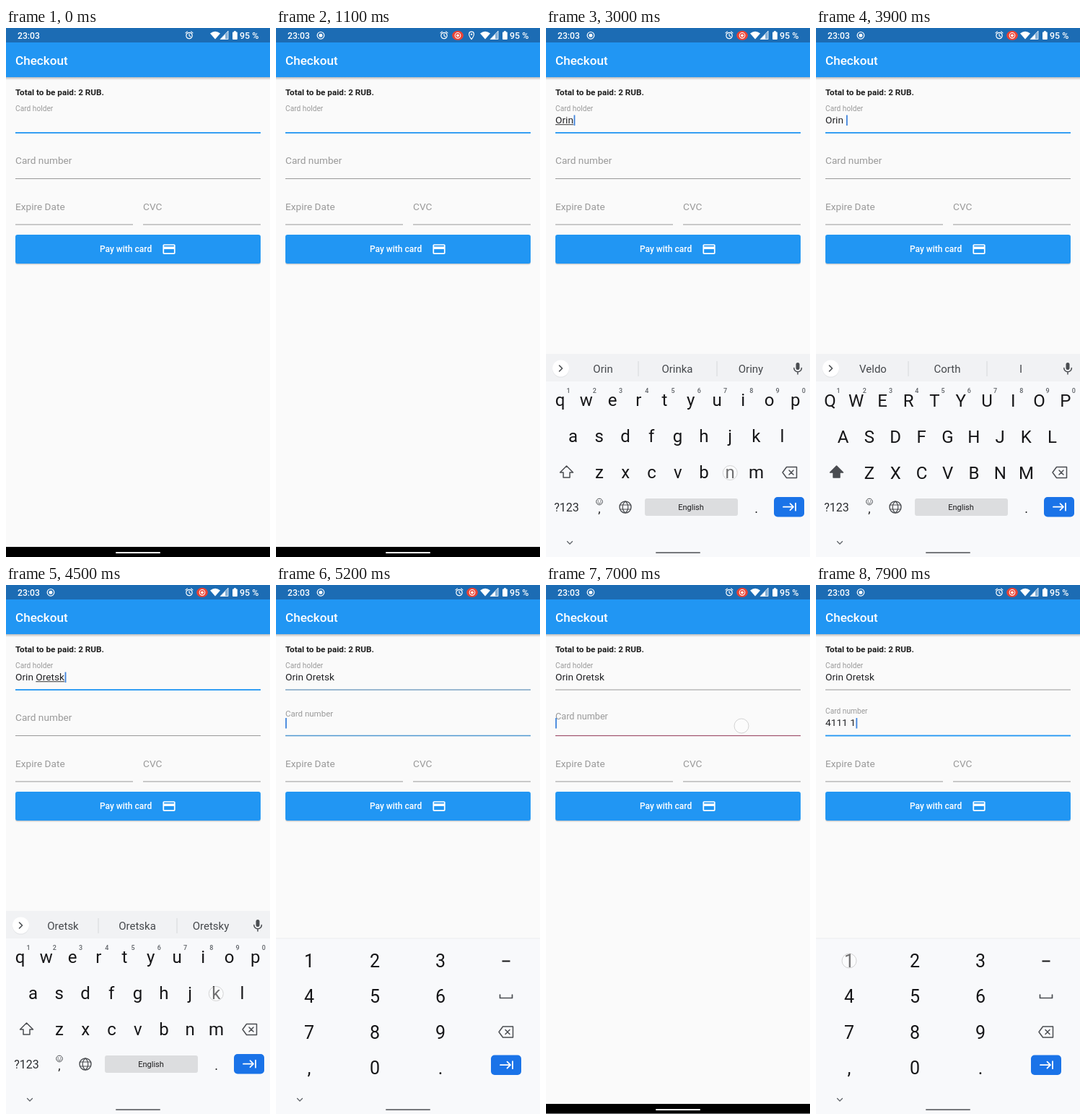
These frames come from a looping animation (366x732 px, 8 s). An HTML page:

```html
<!DOCTYPE html>
<html lang="en">
<head>
<meta charset="utf-8">
<title>Checkout form</title>
<style>
  html, body { margin: 0; width: 100%; height: 100%; overflow: hidden; background: #fafafa; }
  svg { display: block; width: 366px; height: 732px; font-family: Roboto, sans-serif; }
  text { white-space: pre; }
  .mid { text-anchor: middle; }
  .line { fill: none; stroke-linecap: round; stroke-linejoin: round; }
</style>
</head>
<body>
<svg id="stage" viewBox="0 0 366 732" xmlns="http://www.w3.org/2000/svg"></svg>
<script>
const LOOP = 8000, BLUE = '#2196f3', RED = '#d0383c', GREY = '#9a9a9a', PUSH = 18.7;
const stage = document.getElementById('stage');
const $ = id => document.getElementById(id);
const set = (el, attrs) => { for (const k in attrs) el.setAttribute(k, attrs[k]); };

// ---------- markup helpers ----------
const text = (x, y, size, str, fill, extra = '') =>
  `<text x="${x}" y="${y}" font-size="${size}" fill="${fill}" ${extra}>${str}</text>`;
const mid = (x, y, size, str, fill = '#1c1c1e', extra = '') =>
  text(x, y, size, str, fill, 'class="mid" ' + extra);
const rect = (x, y, w, h, fill, extra = '') =>
  `<rect x="${x}" y="${y}" width="${w}" height="${h}" fill="${fill}" ${extra}/>`;
const line = (d, stroke = '#4a4d51', w = 1.5, extra = '') =>
  `<path class="line" d="${d}" stroke="${stroke}" stroke-width="${w}" ${extra}/>`;
const ring = (x, y, r, stroke, w, fill = 'none') =>
  `<circle cx="${x}" cy="${y}" r="${r}" fill="${fill}" stroke="${stroke}" stroke-width="${w}"/>`;
const dot = (x, y, r, fill) => `<circle cx="${x}" cy="${y}" r="${r}" fill="${fill}"/>`;

const enterKey = (x, y) => rect(x, y, 42, 27.5, '#1a73e8', 'rx="5"') +
  line(`M${x + 13} ${y + 13.7}h14m-4.5-4.5l4.5 4.5l-4.5 4.5M${x + 30} ${y + 8.7}v10`, '#fff', 1.8);
const eraseKey = (x, y) =>
  line(`M${x - 10} ${y}l5.5-7.5h14v15h-14zM${x - 1} ${y - 3}l6 6m0-6l-6 6`);
const kbFoot = line('M29.5 710.5l3.5 3.5l3.5-3.5', '#5f6368', 1.3) +
  rect(152, 725, 62, 2, '#77797c', 'rx="1"');

// ---------- keyboards ----------
const ROWS = [['qwertyuiop', 19.5, 522.5], ['asdfghjkl', 37.5, 572.5], ['zxcvbnm', 74, 622.5]];
const keyAt = { ' ': [201, 663] };
let letters = '', hints = '';
ROWS.forEach(([chars, x0, y]) => [...chars].forEach((c, i) => {
  const x = x0 + 36.25 * i;
  keyAt[c] = [x, y - 7];
  letters += mid(x, y, 24, c, '#161618', `data-c="${c}" data-y="${y}"`);
}));
for (let i = 0; i < 10; i++)
  hints += mid(31 + 36.25 * i, 505, 9, (i + 1) % 10, '#5f6368', 'font-weight="500"');

const COLS = [46, 137, 228, 319], PAD = ['123', '456', '789', ',0.'];
let pad = '';
PAD.forEach((row, r) => [...row].forEach((c, i) => {
  const y = 529 + 49.3 * r;
  keyAt[c] = [COLS[i], y - 9];
  pad += mid(COLS[i], y, 25, c, '#161618');
}));

const alphaBoard = rect(0, 451, 366, 281, '#f8f9fb') + rect(0, 451, 366, 38, '#f1f2f4') +
  dot(20.5, 472, 11.5, '#dfe1e4') + dot(20.5, 471, 11.5, '#fff') +
  line('M18.5 467l4 4l-4 4', '#4a4d51', 1.6) +
  rect(127.5, 461, 1, 21, '#d5d7da') + rect(236.5, 461, 1, 21, '#d5d7da') +
  [79, 182, 284].map(x => mid(x, 476.5, 15, '', '#45484c', 'data-s=""')).join('') +
  rect(346.5, 463, 5, 10, '#4a4d51', 'rx="2.5"') +
  line('M343.8 470.5a5.3 5.3 0 0 0 10.6 0M349 476v3') +
  hints + letters +
  line('M28.5 606l9 9h-4.5v7h-9v-7h-4.5z', '#4a4d51', 1.5, 'id="shift"') + eraseKey(338, 615) +
  mid(28.5, 668.5, 16, '?123', '#2c2e31') +
  ring(74, 655.5, 4.3, '#4a4d51', 1) + dot(72.4, 654.5, .7, '#4a4d51') + dot(75.6, 654.5, .7, '#4a4d51') +
  line('M71.8 657q2.2 2 4.4 0', '#4a4d51', .9) + mid(74, 671, 17, ',') +
  ring(110, 663, 8, '#4a4d51', 1.4) +
  line('M102.5 660h15M102.5 666h15M110 655c-5 4-5 12 0 16c5-4 5-12 0-16', '#4a4d51', 1.2) +
  rect(137, 651, 129, 24, '#dcdddf', 'rx="3"') + mid(201, 667, 11, 'English') +
  mid(291.5, 670.5, 18, '.') + enterKey(316, 649) + kbFoot;

const padBoard = rect(0, 489, 366, 243, '#f8f9fb') + rect(0, 488.5, 366, 1, '#eceef0') + pad +
  rect(313.5, 519.5, 11, 2, '#161618') + line('M310.5 567v4.5h17v-4.5', '#4a4d51', 1.7) +
  eraseKey(319, 618.5) + enterKey(298, 650.5) + kbFoot;

// ---------- page ----------
const field = (id, label, y) => `
  <g id="${id}">
    <text class="label" x="13" fill="${GREY}">${label}</text>
    <text class="value" x="13" y="${y - 13.3}" font-size="13.7" fill="#202124"></text>
    <rect class="comp" x="13" y="${y - 11.8}" height="1" fill="#333"/>
    <rect class="caret" y="${y - 24.5}" width="1.8" height="14.5" fill="#3f83dc"/>
    <rect class="base" x="13" width="340"/>
    <text class="error" x="13" y="${y + 16}" font-size="10.2" fill="${RED}">${label} can't be blank</text>
  </g>`;

const statusBar = rect(0, 0, 366, 20, '#1c6cb4') +
  text(16, 14.6, 12.2, '23:03', '#fff', 'font-weight="500"') +
  `<g id="rec">${ring(62, 10.3, 4.8, '#fff', 1.2)}${dot(62, 10.3, 2.5, '#fff')}</g>
  <g id="alarm">${ring(0, 10.5, 4.2, '#fff', 1.2)}${line('M0 8v2.8l2 1.2M-5 6.8l2.4-2M5 6.8l-2.4-2', '#fff', 1.1)}</g>
  <g id="cast"><ellipse cx="0" cy="10.3" rx="7.8" ry="6.5" fill="#ea4335"/>${ring(0, 10.3, 3.8, '#fff', 1.1)}${dot(0, 10.3, 1.9, '#fff')}</g>
  <g id="pin">${line('M271 15.5c-5-6-4-10.300 0-10.300s5 4.300 0 10.300z', '#fff', 1.2)}${dot(271, 8.8, 1.2, '#fff')}</g>` +
  '<path d="M283 7.500Q290 2 297 7.500L290 15.500Z" fill="#fff"/>' +
  '<path d="M308 4.500V15.500H297.500Z" fill="#fff" opacity=".45"/><path d="M304 8.700V15.500H297.500Z" fill="#fff"/>' +
  line('M308 4.500V15.500H297.500Z', '#fff', .8) +
  rect(314, 5.5, 6.8, 10.5, '#fff', 'rx="1"') + rect(316, 4.2, 2.8, 2, '#fff') +
  text(324, 14.6, 12.4, '95 %', '#fff', 'font-weight="500"');

stage.innerHTML = `
  <defs><linearGradient id="fade" x2="0" y2="1">
    <stop stop-color="#000" stop-opacity=".25"/><stop offset="1" stop-color="#000" stop-opacity="0"/>
  </linearGradient></defs>` +
  rect(0, 0, 366, 732, '#fafafa') +
  rect(0, 68, 366, 4, 'url(#fade)') + rect(0, 20, 366, 48, BLUE) + statusBar +
  text(13, 50.5, 17.1, 'Checkout', '#fff', 'font-weight="500"') +
  text(13, 92.5, 11.75, 'Total to be paid: 2 RUB.', '#1d1d1d', 'font-weight="700"') +
  field('holder', 'Card holder', 145) +
  '<g id="below1">' + field('number', 'Card number', 208.5) + '<g id="below2">' +
  text(13, 252, 13.65, 'Expire Date', GREY) + text(190, 252, 13.65, 'CVC', GREY) +
  rect(13, 271.5, 163, 1, GREY) + rect(190, 271.5, 163, 1, GREY) +
  rect(13, 288, 340, 39.5, '#000', 'rx="3" opacity=".16"') + rect(13, 286, 340, 40, BLUE, 'rx="3"') +
  text(130, 310.2, 12, 'Pay with card', '#fff', 'font-weight="500"') +
  `<path transform="translate(215.700 295.700) scale(.86)" fill="#fff" fill-rule="evenodd"
    d="M4 4h16a2 2 0 0 1 2 2v12a2 2 0 0 1-2 2H4a2 2 0 0 1-2-2V6a2 2 0 0 1 2-2zM4 6v2h16V6zM4 12v6h16v-6z"/>` +
  '</g></g>' +
  rect(0, 718, 366, 14, '#000') + rect(152, 725, 62, 2, '#fff', 'rx="1"') +
  `<g id="alpha">${alphaBoard}</g><g id="pad">${padBoard}</g>
  <circle id="touch" r="10" fill="#fff" fill-opacity=".55" stroke="#bdbdbd" stroke-width=".9"/>`;

// ---------- script of events ----------
const strokes = (str, times) => [...str].map((c, i) => [times[i], c]);
const NAME = strokes('Orin Oretsk', [2500, 2650, 2800, 2950, 3700, 4000, 4100, 4200, 4300, 4400, 4500]);
const DIGITS = strokes('4111 1', [7400, 7500, 7600, 7700, 7870, 7870]);
const TAPS = [[1130, 200, 306], [1960, 200, 118], [4950, 337, 663], [6080, 33, 712],
  [6400, 200, 306], [6900, 271, 195]];
for (const [t, c] of [...NAME, ...DIGITS.slice(0, 5)]) {
  const key = keyAt[c === ' ' && t > 7000 ? '1' : c.toLowerCase()];
  TAPS.push([t - 40, ...key]);
}

const ease = (t, from, dur = 200) => {
  const p = Math.min(1, Math.max(0, (t - from) / dur));
  return p * p * (3 - 2 * p);
};
const typed = (list, t) => list.filter(k => k[0] <= t).map(k => k[1]).join('');
const within = (t, ...spans) => spans.some(([a, b]) => t >= a && t < b);
const pen = document.createElement('canvas').getContext('2d');
const widthOf = str => { pen.font = '13.7px Roboto, sans-serif'; return pen.measureText(str).width; };
const rgb = hex => [1, 3, 5].map(i => parseInt(hex.slice(i, i + 2), 16));
const mix = (a, b, p) => {
  const to = rgb(b);
  return `rgb(${rgb(a).map((v, i) => Math.round(v + (to[i] - v) * p))})`;
};

function drawField(id, y, s) {
  const q = c => $(id).querySelector('.' + c);
  const up = s.value ? 1 : s.focus;
  set(q('label'), { 'font-size': 13.65 - 3.45 * up, y: y - 20.2 - 9.9 * up });
  q('value').textContent = s.value;
  const w = widthOf(s.value);
  const start = s.value.lastIndexOf(' ') + 1, skip = widthOf(s.value.slice(0, start));
  set(q('comp'), { x: 13 + skip, width: s.composing ? Math.max(0, w - skip) : 0 });
  set(q('caret'), { x: 13 + w + (s.value ? .6 : 0), opacity: s.caret ? 1 : 0 });
  const h = 1 + .8 * s.focus;
  set(q('base'), { y: y - h / 2, height: h, fill: mix(s.from, BLUE, s.focus) });
  set(q('error'), { opacity: s.error });
}

function suggest(name) {
  const [first, last] = name.split(' ');
  if (!name) return ['', '', ''];
  if (last === undefined) return [first, first + 'ka', first + 'y'];
  return last ? [last, last + 'a', last + 'y'] : ['Veldo', 'Corth', 'I'];
}

function draw(t) {
  const name = typed(NAME, t), digits = typed(DIGITS, t);
  const err1 = within(t, [1250, 2060]), err2 = within(t, [6500, 6930]);

  drawField('holder', 145, {
    value: name,
    focus: t < 2060 ? 1 - ease(t, 1250) : ease(t, 2060) - ease(t, 5086),
    from: within(t, [1250, 2300]) ? RED : GREY,
    composing: t < 4700,
    caret: within(t, [500, 1000], [2060, 3450], [3700, 5086]),
    error: err1 ? ease(t, 1250, 170) : 0
  });
  drawField('number', 208.5, {
    value: digits,
    focus: ease(t, 5086) - ease(t, 6500) + ease(t, 6932),
    from: within(t, [6500, 7200]) ? RED : GREY,
    composing: false,
    caret: within(t, [5086, 5500], [5750, 6500], [6932, LOOP]),
    error: err2 ? ease(t, 6500, 170) : 0
  });
  set($('below1'), { transform: `translate(0 ${err1 ? PUSH : 0})` });
  set($('below2'), { transform: `translate(0 ${err2 ? PUSH : 0})` });

  // status icons
  const rec = t >= 100, pin = within(t, [200, 2450]);
  set($('rec'), { opacity: +rec });
  set($('cast'), { opacity: +rec, transform: `translate(${pin ? 252 : 272} 0)` });
  set($('pin'), { opacity: +pin });
  set($('alarm'), { transform: `translate(${pin ? 233 : 254} 0)` });

  // keyboards
  const numeric = t >= 5150;
  const shown = ease(t, 2150) - ease(t, 6100) + ease(t, 7000);
  const place = (id, on, h) => set($(id), {
    transform: `translate(0 ${(1 - shown) * h})`, display: on && shown > 0 ? 'inline' : 'none'
  });
  place('alpha', !numeric, 281);
  place('pad', numeric, 243);
  const caps = !name || name.endsWith(' ');
  document.querySelectorAll('[data-c]').forEach(el => {
    el.textContent = caps ? el.dataset.c.toUpperCase() : el.dataset.c;
    el.setAttribute('y', +el.dataset.y + (caps ? 1.8 : 0));
  });
  $('shift').style.fill = caps ? '#4a4d51' : 'none';
  const words = suggest(name);
  document.querySelectorAll('[data-s]').forEach((el, i) => { el.textContent = words[i]; });

  // finger marker
  const tap = TAPS.find(k => t >= k[0] && t < k[0] + 110);
  set($('touch'), tap ? { cx: tap[1], cy: tap[2], opacity: .7 } : { opacity: 0 });
}

const begin = performance.now();
function tick() {
  draw((performance.now() - begin) % LOOP);
  requestAnimationFrame(tick);
}
draw(0);
requestAnimationFrame(tick);
</script>
</body>
</html>
```
